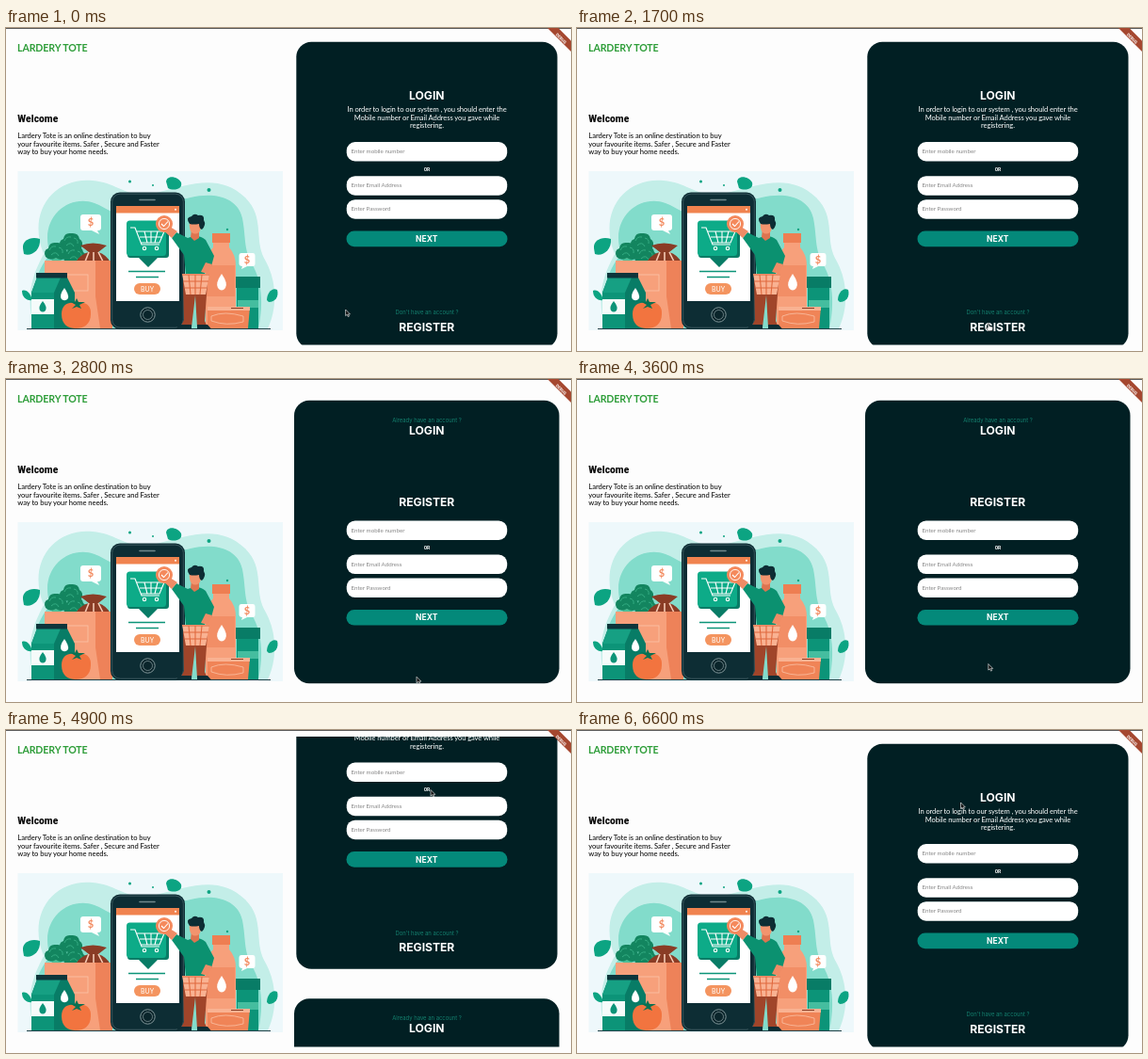
An HTML page that plays this animation: 600 by 343 pixels, repeating every 6.7 s.

```html
<!DOCTYPE html>
<html lang="en">
<head>
<meta charset="utf-8">
<title>Lardery Tote</title>
<style>
html, body { margin: 0; width: 100%; height: 100%; overflow: hidden; background: #fdfdfd; }
svg { display: block; width: 600px; height: 343px; }
.brand { font: 700 10.6px Lato, sans-serif; fill: #2f9e3a; letter-spacing: -.1px; }
.welcome { font: 800 10.2px Roboto, sans-serif; font-stretch: 75%; letter-spacing: .1px; fill: #0c0c0c; }
.body { font: 500 7.6px Lato, sans-serif; fill: #111; letter-spacing: -.05px; }
.mid { text-anchor: middle; }
.intro { font: 400 7.6px Lato, sans-serif; fill: #fff; letter-spacing: -.1px; }
.title { font: 700 12.1px Inter, sans-serif; fill: #fff; }
.next { font: 700 8.5px Inter, sans-serif; fill: #fff; }
.or { font: 700 5px Roboto, sans-serif; font-stretch: 75%; fill: #fff; }
.hint { font: 400 6.2px Lato, sans-serif; fill: #868686; }
.ask { font: 400 5.9px Inter, sans-serif; fill: #14806f; }
.debug { font: 700 4.4px Roboto, sans-serif; fill: #fff; }
.coin { font: 700 11px Lato, sans-serif; fill: #f2885c; }
.buy { font: 400 7px Lato, sans-serif; fill: #fff; }
</style>
</head>
<body>
<svg viewBox="0 0 600 343">
  <defs>
    <clipPath id="view"><rect x="300" y="7" width="300" height="329.5"/></clipPath>
    <clipPath id="art"><rect x="12.5" y="152" width="281.5" height="169"/></clipPath>
    <g id="form">
      <g fill="#fff">
        <rect x="361.7" y="121" width="170.5" height="20.5" rx="9"/>
        <rect x="361.7" y="157.2" width="170.5" height="20.5" rx="9"/>
        <rect x="361.7" y="182.2" width="170.5" height="20.5" rx="9"/>
      </g>
      <g class="hint">
        <text x="366.5" y="133.2">Enter mobile number</text>
        <text x="366.5" y="169.4">Enter Email Address</text>
        <text x="366.5" y="194.4">Enter Password</text>
      </g>
      <text class="or mid" x="447" y="151.5">OR</text>
      <rect x="361.5" y="215.6" width="171" height="16.6" rx="8.3" fill="#04897a"/>
      <text class="next mid" x="446.7" y="227">NEXT</text>
    </g>
    <g id="broccoli">
      <path d="M-4 4H5L7 16H-5Z" fill="#4dbf97"/>
      <path d="M-11 5Q-14 -2 -8 -4Q-7 -11 0 -10Q8 -11 9 -4Q14 -1 11 6Q6 10 0 6Q-6 10 -11 5Z" fill="#13855f"/>
      <path d="M-7 -2Q-5 -7 0 -6M3 -5Q8 -4 7 1M-5 3Q0 -2 3 4" fill="none" stroke="#34ad83"/>
    </g>
  </defs>

  <rect width="600" height="343" fill="#fdfdfd"/>
  <rect width="600" height="1" fill="#5a5a5a"/>
  <text class="brand" x="12" y="25">LARDERY TOTE</text>
  <text class="welcome" x="12.3" y="100.2">Welcome</text>
  <g class="body">
    <text x="12.3" y="117.4">Lardery Tote is an online destination to buy</text>
    <text x="12.3" y="125.8">your favourite items. Safer , Secure and Faster</text>
    <text x="12.3" y="134.2">way to buy your home needs.</text>
  </g>

  <g clip-path="url(#art)">
    <rect x="12" y="152" width="282" height="169" fill="#eef8fb"/>
    <path d="M30 319C20 285 28 262 40 240C22 196 50 158 92 162C118 164 130 182 156 176C196 166 226 154 254 180C276 202 262 226 276 248C289 272 287 300 278 319Z" fill="#c3eee8"/>
    <path d="M32 319C22 290 30 260 47 240C34 202 66 176 94 186C112 193 116 202 132 196C162 184 180 184 196 180C222 174 246 180 251 202C255 222 252 236 262 252C274 274 272 300 268 319Z" fill="#82dccb"/>

    <g fill="#0ca482">
      <path d="M170 163C171 156 182 157 186 164C188 172 177 173 172 170Z"/>
      <path d="M18 234C17 225 27 221 36 224C37 236 27 243 19 240Z"/>
      <path d="M17 279C22 277 26 282 28 289C22 290 17 286 17 279Z"/>
      <path d="M277 289C277 281 283 275 288 278C290 285 286 291 279 291Z"/>
      <circle cx="131.5" cy="163" r="1.5"/><circle cx="215.5" cy="172" r="2"/>
      <circle cx="235" cy="214" r="1.2"/><circle cx="156" cy="167" r="1"/>
    </g>
    <g fill="#fff">
      <path d="M82 198H98Q101 198 101 201V212Q101 215 98 215H97L99 219L91 215H82Q79 215 79 212V201Q79 198 82 198Z"/>
      <path d="M250 239H262Q264.5 239 264.5 242V250Q264.5 253 262 253H256L250 256L251 253Q247.5 253 247.5 250V242Q247.5 239 250 239Z"/>
    </g>
    <text class="coin mid" x="90" y="210.3">$</text>
    <text class="coin mid" x="256" y="249.8">$</text>

    <!-- bag and vegetables -->
    <use href="#broccoli" x="69" y="228"/>
    <use href="#broccoli" x="53" y="238"/>
    <use href="#broccoli" x="73" y="242"/>
    <path d="M75 247Q80 240 88 238L79 231Q92 226 107 231L98 238Q107 241 111 249Z" fill="#8a3c25"/>
    <path d="M88 238L84 248M93 238V248M98 238L103 248" stroke="#f4c9b3" stroke-width="1.6"/>
    <path d="M41 247H113V319H41Z" fill="#f7a07b"/>
    <path d="M95 247H113V319H100L95 285Z" fill="#ee8259"/>
    <rect x="58" y="262" width="29" height="17" fill="none" stroke="#fbc3a9" stroke-width=".8"/>

    <!-- carton -->
    <path d="M33 265H65L73 281V319H27V281Z" fill="#087c66"/>
    <path d="M33 265H58L51 281H27Z" fill="#16a083"/>
    <path d="M27 281H51V319H27Z" fill="#0c9478"/>
    <path d="M32 260H65V265.5H32Z" fill="#0d353b"/>
    <path d="M27 288H51V304H27Z" fill="#f5fbfa"/>
    <path d="M39 290Q34 296 36 300Q39 303 42 300Q44 296 39 290Z" fill="#0c9478"/>
    <path d="M62 276Q56 284 59 288Q63 291 66 287Q67 283 62 276Z" fill="#fff"/>

    <!-- right-hand groceries -->
    <path d="M245 274H268V319H245Z" fill="#0c9478"/>
    <path d="M242 264H270V276H242Z" fill="#087c66"/>
    <path d="M246 289H268V297H246Z" fill="#45bd9f"/>
    <path d="M220 227H237V233Q244 241 244 252V319H212V252Q212 241 220 233Z" fill="#f7a07b"/>
    <path d="M219 218H238V228H219Z" fill="#ee7e52"/>
    <path d="M213 252H243V285H213Z" fill="#f28e66"/>
    <path d="M229 261Q222 271 225 276Q229 281 233 276Q236 271 229 261Z" fill="#fff"/>
    <path d="M214 296H259L257 319H214Z" fill="#f08457"/>
    <path d="M214 296H259V300H214Z" fill="#f9b292"/>
    <path d="M218 306Q232 300 252 306V312Q234 317 218 311Z" fill="none" stroke="#f9c0a5" stroke-width=".8"/>
    <path d="M239 297.5H252" stroke="#8a3c25" stroke-width="1.2"/>

    <!-- phone -->
    <rect x="111" y="174.5" width="79" height="145.5" rx="10" fill="#0d2d34"/>
    <rect x="112.7" y="176.2" width="75.6" height="142" rx="8.5" fill="none" stroke="#4a686d" stroke-width=".7"/>
    <rect x="117" y="189" width="67" height="101" fill="#fff"/>
    <rect x="117" y="189" width="67" height="7.5" fill="#f0834f"/>
    <path d="M142 182.5H158" stroke="#70888c" stroke-width="1.6" stroke-linecap="round"/>
    <circle cx="180" cy="192.8" r="1" fill="#fff"/>
    <circle cx="150.5" cy="304.5" r="7.7" fill="#0a252b" stroke="#8fa3a5" stroke-width=".9"/>
    <circle cx="150.5" cy="304.5" r="5" fill="none" stroke="#8fa3a5" stroke-width=".7"/>
    <path id="bubble" d="M132 205H170Q173 205 173 209V241Q173 244 170 244H161L151 254L141 244H132Q129 244 129 241V209Q129 205 132 205Z" fill="#087c66"/>
    <rect x="128" y="204.5" width="42" height="37.5" rx="3.5" fill="#0dab88"/>
    <g fill="none" stroke="#fff" stroke-width="1.1">
      <path d="M132 212H137L144 230H163M139 216H168L163 228H143M142 222H166M147 216L150 228M154 216V228M161 216L158 228"/>
      <circle cx="147" cy="234" r="1.7"/><circle cx="160" cy="234" r="1.7"/>
    </g>
    <path d="M130 258.5H169M138 264.5H162" stroke="#0c9478" stroke-width="1.4"/>
    <rect x="136" y="271" width="28" height="12" rx="6" fill="#f4945f"/>
    <text class="buy mid" x="150" y="279.6">BUY</text>

    <!-- shopper -->
    <path d="M188 270H214L211 311L214 318H203L201 284L197 318H185L189 310Z" fill="#a0452a"/>
    <path d="M183 315H197V319.5H181ZM203 315H214L218 319.5H203Z" fill="#0d2d34"/>
    <path d="M193 223Q204 218 212 225L221 242L218 253L212 251L211 262H191L189 241L176 223L181 217Z" fill="#0b9170"/>
    <path d="M182 216L176 223L165 213Q165 207 171 209Z" fill="#ee8c66"/>
    <path d="M197 214H205V223L200 226L196 222Z" fill="#dd7450"/>
    <path d="M195 206H207Q208 213 205 217Q201 220 197 217Q194 213 195 206Z" fill="#f2946e"/>
    <path d="M195 208Q190 201 197 200Q200 196 204 199Q211 198 210 204Q213 209 208 214Q205 213 205 208Q199 209 195 208Z" fill="#0d2d34"/>
    <circle cx="168" cy="208" r="9" fill="#f4895c"/>
    <circle cx="168" cy="208" r="5.6" fill="none" stroke="#fff" stroke-width=".9"/>
    <path d="M165 208L167.5 210.5L172 205.5" fill="none" stroke="#fff" stroke-width="1.1"/>
    <path d="M219 251L214 261L207 259L212 249Z" fill="#ee8c66"/>
    <path d="M187 261H216L212 283H191Z" fill="#f9b292"/>
    <path d="M187 262H216M188 269H215M190 276H213M194 262L196 283M201 262V283M208 262L206 283" stroke="#e0693e" stroke-width="1.1"/>

    <!-- tomato -->
    <path d="M59 304C59 292 69 290 75 293C84 289 91 295 90 304C90 315 82 319 74 319C66 319 59 315 59 304Z" fill="#f2743f"/>
    <path d="M74 294L67 290L73 291L75 287L77 291L84 291L78 294L80 298L75 296L70 298Z" fill="#087052"/>
    <path d="M22 319.5H281" stroke="#0d2d34" stroke-width=".9"/>
  </g>

  <g clip-path="url(#view)">
    <g id="scroll">
      <rect x="308.3" y="14.8" width="277.2" height="325.5" rx="16" fill="#011f23"/>
      <text class="title mid" x="446.8" y="76.4">LOGIN</text>
      <g class="intro mid">
        <text x="447" y="89">In order to login to our system , you should enter the</text>
        <text x="447" y="97.6">Mobile number or Email Address you gave while</text>
        <text x="447" y="106.1">registering.</text>
      </g>
      <use href="#form"/>
      <text class="ask mid" x="447" y="304">Don't have an account ?</text>
      <text class="title mid" x="446.8" y="321.6">REGISTER</text>

      <rect x="306" y="371.8" width="281.5" height="300.5" rx="16" fill="#011f23"/>
      <text class="ask mid" x="447" y="394.5">Already have an account ?</text>
      <text class="title mid" x="446.8" y="407.6">LOGIN</text>
      <text class="title mid" x="446.8" y="484.3">REGISTER</text>
      <use href="#form" y="378.4"/>
    </g>
  </g>

  <path d="M575 0H586.5L600 13.5V25Z" fill="#a5472f"/>
  <text class="debug mid" transform="translate(589.3 11.3) rotate(45)" y="1.2">DEBUG</text>

  <g id="cursor" stroke-linejoin="round">
    <path id="arrow" d="M0 0V6.6L1.6 5.2L2.7 7.6L3.8 7.1L2.8 4.9H4.8Z" fill="#111" stroke="#fff" stroke-width=".6"/>
    <path id="hand" d="M-.8 0Q0 -.8 .8 0V2.6L4 3.4Q4.8 3.7 4.6 5L3.9 7.6H-.3L-2.5 4.6Q-2.3 3.6 -.8 4.6Z" fill="#fff" stroke="#222" stroke-width=".6"/>
  </g>
</svg>
<script>
const LOOP = 6700, TICK = 100, SLIDE = 577, DEPTH = 349;
const DOWN = 2197, UP = 4466;

// time, x, y of the pointer tip
const path = [
  [0, 360.6, 299], [700, 430, 318], [1400, 437, 314], [2100, 437, 314],
  [2200, 436, 316], [3500, 436, 316.5], [4200, 451, 64], [5600, 451, 63],
  [6300, 407.5, 77], [LOOP, 407.5, 77]
];
const $ = id => document.getElementById(id);
const clamp = v => Math.max(0, Math.min(1, v));

function pointer(t) {
  const i = path.findIndex(p => p[0] > t);
  const a = path[i - 1], b = path[i];
  const k = (t - a[0]) / (b[0] - a[0]);
  const e = k * k * (3 - 2 * k);
  return [a[1] + (b[1] - a[1]) * e, a[2] + (b[2] - a[2]) * e];
}

function draw(t) {
  const offset = DEPTH * (clamp((t - DOWN) / SLIDE) - clamp((t - UP) / SLIDE));
  $("scroll").setAttribute("transform", `translate(0 ${-offset})`);
  $("cursor").setAttribute("transform", `translate(${pointer(t)})`);
  const hover = (t >= 1200 && t < 2300) || (t >= 4200 && t < 4500);
  $("hand").style.display = hover ? "" : "none";
  $("arrow").style.display = hover ? "none" : "";
}

const start = performance.now();
function frame() {
  const t = (performance.now() - start) % LOOP;
  draw(Math.floor(t / TICK) * TICK);
  requestAnimationFrame(frame);
}
frame();
</script>
</body>
</html>
```
